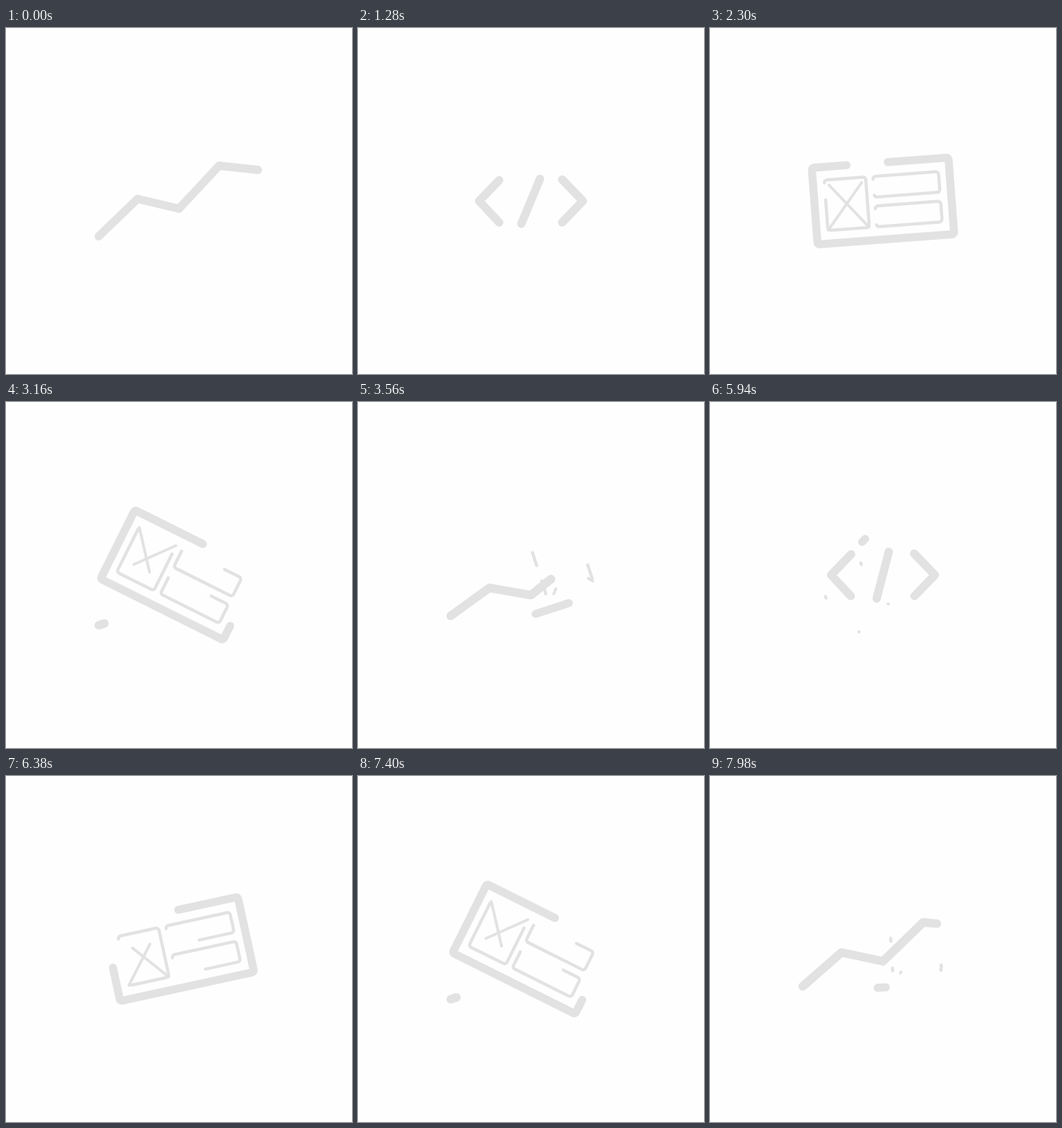
Animation of 500 by 500 pixels, one loop 8 s. Source, as an HTML page with a canvas:

```html
<!DOCTYPE html>
<html lang="en">
<head>
<meta charset="utf-8">
<title>Icon morph</title>
<style>
  html, body { margin: 0; width: 100%; height: 100%; overflow: hidden; background: #fefefe; }
  canvas { display: block; width: 100vmin; height: 100vmin; margin: auto; }
</style>
</head>
<body>
<canvas width="500" height="500"></canvas>
<script>
const ctx = document.querySelector('canvas').getContext('2d');
const LOOP = 8000, CYCLE = 4240;

const CHART = [[134, 301], [190, 247], [250, 261], [308, 199], [364, 205]];
const CHART_BASE = 333;
const LEFT_BRACKET = [[204, 281], [175, 250], [204, 220]];
const RIGHT_BRACKET = [[295, 281], [325, 250], [295, 219]];
const SLASH = [[236, 283], [263, 218]];

const lerp = (a, b, u) => a + (b - a) * u;
const morph = (from, to, u) =>
  from.map(([x, y], i) => [lerp(x, to[i][0], u), lerp(y, to[i][1], u)]);

// Progress from start to end: `a` softens the beginning, `b` the ending.
function ease(t, start, end, a, b) {
  const x = Math.min(1, Math.max(0, (t - start) / (end - start)));
  return 1 - (1 - x ** a) ** b;
}
const smooth = (t, start, end) => (1 - Math.cos(Math.PI * ease(t, start, end, 1, 1))) / 2;

// Strokes the part of the current path between two fractions of its length.
function strokePart(length, from, to, width) {
  if (to - from < 0.002) return;
  ctx.setLineDash([length * (to - from), 1e4]);
  ctx.lineDashOffset = -length * from;
  ctx.lineWidth = width;
  ctx.stroke();
}

function polyline(points, from, to, width) {
  let length = 0;
  ctx.beginPath();
  points.forEach(([x, y], i) => {
    ctx.lineTo(x, y);
    if (i) length += Math.hypot(x - points[i - 1][0], y - points[i - 1][1]);
  });
  strokePart(length, from, to, width);
}

// Clockwise rounded box that starts on its top edge, or below the top left corner.
function box(x0, y0, x1, y1, r, from, to, width, topStart) {
  ctx.beginPath();
  if (topStart === undefined) {
    ctx.moveTo(x0, y0 + r);
    ctx.arcTo(x0, y0, x1, y0, r);
  } else {
    ctx.moveTo(topStart, y0);
  }
  ctx.arcTo(x1, y0, x1, y1, r);
  ctx.arcTo(x1, y1, x0, y1, r);
  ctx.arcTo(x0, y1, x0, y0, r);
  if (topStart === undefined) {
    ctx.lineTo(x0, y0 + r);
  } else {
    ctx.arcTo(x0, y0, x1, y0, r);
    ctx.lineTo(topStart, y0);
  }
  strokePart(2 * (x1 - x0 + y1 - y0) - (8 - 2 * Math.PI) * r, from, to, width);
}

function around(x, y, angle, scale, paint) {
  ctx.save();
  ctx.translate(x, y);
  ctx.rotate(angle * Math.PI / 180);
  ctx.scale(scale, scale);
  ctx.translate(-x, -y);
  paint();
  ctx.restore();
}

function chartIn(t) {
  const u = ease(t, 3080, 4240, 1.8, 4.47);
  const rise = 0.3 + 0.7 * u;
  polyline(CHART.map(([x, y]) => [x, lerp(CHART_BASE, y, rise)]), 0, u, 12.4);
}

// The chart splits at its middle point into the two brackets.
function chartToCode(t) {
  const u = -0.02 * smooth(t, 20, 300) + 1.02 * ease(t, 320, 1290, 2.5, 11.5);
  const gone = ease(t, 1690, 2080, 1.5, 2);
  const swell = 1 + 0.54 * Math.sin(Math.PI * Math.max(0, u) ** 1.5);
  polyline(morph(CHART.slice(0, 3), LEFT_BRACKET, u), gone, 1, 12);
  around(309, 246, 0, swell, () =>
    polyline(morph(CHART.slice(2), RIGHT_BRACKET, u), gone, 1, 12));
  around(249.5, 250.5, -8 * smooth(t, 1360, 1660), 1, () =>
    polyline(SLASH, gone, ease(t, 600, 1280, 1.6, 3), 12));
}

function card(t) {
  const to = ease(t, 1680, 2640, 1.5, 3.16);
  const from = ease(t, 3080, 4240, 1, 4.64);
  const angle = -44 * (1 - to) - 6.5 * smooth(t, 2740, 2980)
    + 186.5 * ease(t, 3080, 4240, 1.3, 6.1);
  ctx.save();
  ctx.translate(250, 250);
  ctx.rotate(angle * Math.PI / 180);
  box(-99, -55.5, 99, 55.5, 3, from, to, 11.6, 11);
  box(-82.5, -36.5, -22.5, 36.5, 4, from, to, 4.5);
  box(-12, -36.5, 83, -6.5, 4, from, to, 4.5);
  box(-12, 6.5, 83, 36.5, 4, from, to, 4.5);
  polyline([[-23, 36], [-82, -36]], from, to, 4);
  polyline([[-82, 36], [-23, -36]], from, to, 4);
  ctx.restore();
}

function draw(now) {
  const t = now % LOOP % CYCLE;
  ctx.fillStyle = '#fefefe';
  ctx.fillRect(0, 0, 500, 500);
  ctx.strokeStyle = '#e2e2e2';
  ctx.lineCap = ctx.lineJoin = 'round';
  if (t < 2080) chartToCode(t);
  if (t > 1680) card(t);
  if (t > 3080) chartIn(t);
  requestAnimationFrame(() => draw(performance.now() - start));
}
const start = performance.now();
draw(0);
</script>
</body>
</html>
```
